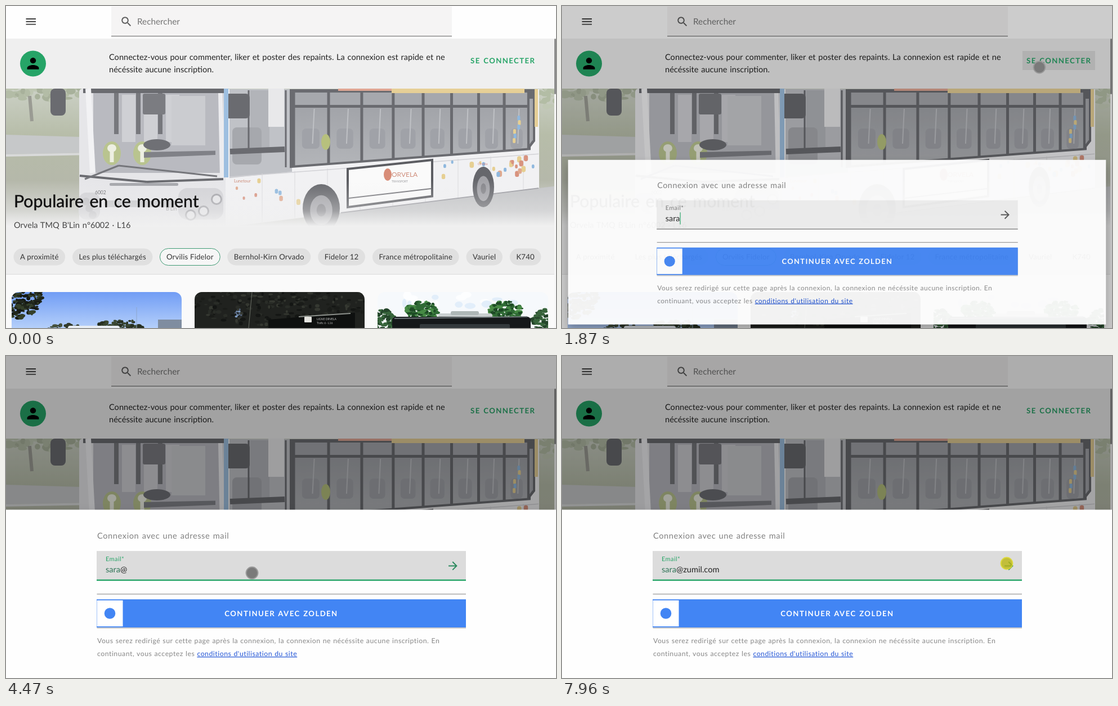
Write an HTML page with a canvas that moves like this. It is 977x573 px and loops after 8 s.

```html
<!DOCTYPE html>
<html lang="fr">
<head>
<meta charset="utf-8">
<title>Connexion</title>
<style>
  html, body { margin: 0; width: 100%; height: 100%; overflow: hidden; background: #fafafa; }
  canvas, svg { position: absolute; left: 0; top: 0; width: 977px; height: 573px; }
  text { font-family: Lato, "Open Sans", sans-serif; font-size: 14.6px; word-spacing: 1px; fill: #222; text-rendering: geometricPrecision; white-space: pre; }
  .cta { font-size: 13.2px; font-weight: 700; letter-spacing: 1.4px; fill: #26a467; }
  .title { font-size: 30.2px; word-spacing: 2.8px; fill: #111; stroke: #111; stroke-width: .45px; }
  .chip { font-size: 13.2px; letter-spacing: .2px; word-spacing: 0; fill: #333; }
  .note { font-size: 12.3px; letter-spacing: .5px; word-spacing: .5px; fill: #888; }
  .note a { fill: #2456d6; text-decoration: underline; }
  #paper { filter: drop-shadow(0 8px 8px rgba(0, 0, 0, .25)); }
</style>
</head>
<body>
<canvas id="scene" width="977" height="573"></canvas>
<svg viewBox="0 0 977 573">
  <path d="M35.5 23H53M35.5 27.8H53M35.5 32.6H53" stroke="#3c3c3c" stroke-width="1.9"/>
  <path transform="translate(202.4 16.4) scale(.96)" fill="#5c5c5c" d="M15.5 14h-.79l-.28-.27C15.41 12.59 16 11.11 16 9.5 16 5.91 13.09 3 9.5 3S3 5.91 3 9.5 5.91 16 9.5 16c1.61 0 3.09-.59 4.23-1.57l.27.28v.79l5 4.99L20.49 19l-4.99-5zm-6 0C7.01 14 5 11.99 5 9.5S7.01 5 9.5 5 14 7.01 14 9.5 11.99 14 9.5 14z"/>
  <text x="233" y="33" style="font-size:15.3px;fill:#757575">Rechercher</text>

  <circle cx="48" cy="102.5" r="23" fill="#26a467"/>
  <path transform="translate(32.4 86.7) scale(1.3)" d="M12 12c2.21 0 4-1.79 4-4s-1.79-4-4-4-4 1.79-4 4 1.79 4 4 4zm0 2c-2.67 0-8 1.34-8 4v2h16v-2c0-2.66-5.33-4-8-4z"/>
  <text x="183" y="96">Connectez-vous pour commenter, liker et poster des repaints. La connexion est rapide et ne</text>
  <text x="183" y="118">nécéssite aucune inscription.</text>
  <rect id="hover" x="818" y="80" width="129" height="34" fill="#000" fill-opacity=".08"/>
  <text class="cta" x="825" y="102">SE CONNECTER</text>

  <text class="title" x="14" y="358">Populaire en ce moment</text>
  <text x="14" y="394.5" style="fill:#444">Orvela TMQ B'Lin n°6002 · L16</text>
  <clipPath id="row"><rect y="430" width="959" height="33"/></clipPath>
  <g id="chips" clip-path="url(#row)"></g>

  <rect id="scrim" width="977" height="573"/>
  <g id="sheet">
    <rect id="paper" y="273.5" width="977" height="299.5" fill="#fefefe"/>
    <text x="162" y="325" style="letter-spacing:.6px;fill:#808080">Connexion avec une adresse mail</text>
    <rect id="field" x="161" y="347" width="656" height="53"/>
    <rect id="rule" x="161" width="656"/>
    <text id="label" x="177" y="365" style="font-size:11px;letter-spacing:.4px">Email*</text>
    <text id="mail" x="177" y="385"><tspan id="stem">sara</tspan><tspan id="tail"></tspan></text>
    <rect id="caret" y="369" width="1.2" height="22" fill="#26a467"/>
    <path id="arrow" transform="translate(782.2 361.7) scale(.98)" d="M12 4l-1.41 1.41L16.17 11H4v2h12.17l-5.58 5.59L12 20l8-8z"/>
    <path d="M161.5 423.6H817" stroke="#999" stroke-width="1.2"/>
    <rect x="161.5" y="435" width="655.5" height="50" fill="#000" fill-opacity=".2"/>
    <rect x="161" y="433" width="656" height="50" fill="#4285f4"/>
    <rect x="161.5" y="434.8" width="46" height="46.4" fill="#fff"/>
    <circle cx="184.5" cy="458" r="9.8" fill="#4285f4"/>
    <text class="cta" x="489" y="463" text-anchor="middle" style="fill:#fff">CONTINUER AVEC ZOLDEN</text>
    <text class="note" x="162" y="511">Vous serez redirigé sur cette page après la connexion, la connexion ne nécéssite aucune inscription. En</text>
    <text class="note" x="162" y="534">continuant, vous acceptez les <a>conditions d'utilisation du site</a></text>
  </g>
  <circle id="pointer" r="10.4" stroke-width="2"/>
</svg>
<script>
const $ = id => document.getElementById(id);
const c = $('scene').getContext('2d');

let seed = 7;
const rnd = () => (seed = seed * 16807 % 2147483647) / 2147483647;

const box = (color, x, y, w, h, r = 0) => {
  c.fillStyle = color; c.beginPath(); c.roundRect(x, y, w, h, r); c.fill();
};
const oval = (color, x, y, rx, ry = rx) => {
  c.fillStyle = color; c.beginPath(); c.ellipse(x, y, rx, ry, 0, 0, 7); c.fill();
};
const line = (color, width, x0, y0, x1, y1) => {
  c.strokeStyle = color; c.lineWidth = width;
  c.beginPath(); c.moveTo(x0, y0); c.lineTo(x1, y1); c.stroke();
};
// Strip from x = a to x = b between two sloping edges
const band = (color, a, b, top, bottom) => {
  c.fillStyle = color; c.beginPath();
  c.moveTo(a, top(a)); c.lineTo(b, top(b)); c.lineTo(b, bottom(b)); c.lineTo(a, bottom(a)); c.fill();
};
const slope = (x0, y0, k = 0) => x => y0 + (x - x0) * k;
const ramp = (y0, y1, ...colors) => {
  const g = c.createLinearGradient(0, y0, 0, y1);
  colors.forEach((color, i) => g.addColorStop(i / (colors.length - 1), color));
  return g;
};
const leaves = (n, x, y, w, h, size, ...colors) => {
  for (let i = 0; i < n; i++) {
    const a = rnd() * 6.283, d = Math.sqrt(rnd());
    oval(colors[i % colors.length], x + Math.cos(a) * d * w, y + Math.sin(a) * d * h, size * (.4 + rnd()), size * (.3 + rnd() * .6));
  }
};
const sign = (str, x, y, size, color) => {
  c.font = `${size}px Lato, sans-serif`; c.fillStyle = color; c.fillText(str, x, y);
};
const clipped = (x, y, w, h, r, paint) => {
  c.save(); c.beginPath(); c.roundRect(x, y, w, h, r); c.clip(); paint(); c.restore();
};

const DARK = '#6a6b70', GLASS = '#a6a8ad', PALE = '#f1f1f3';
const roof = slope(0, 148), belt = slope(508, 288, -.075), foot = slope(395, 393, -.125);

function landscape() {
  box(ramp(147, 393, '#cbd0c5', '#b7bda9', '#b5b8aa', '#c9cac6'), 0, 147, 974, 246);
  leaves(70, 60, 152, 85, 20, 8, '#b3bca6', '#bec6b2', '#a8b19b');
  leaves(30, 960, 160, 20, 40, 7, '#b3bda5', '#c0c8b4');
  line('#9a9b93', 6, 42, 160, 46, 205);
  band('#c6c8c9', 0, 140, slope(0, 229, .03), slope(0, 264, -.02));
  band('#d9dada', 0, 140, slope(0, 264, -.02), slope(0, 268, -.02));
  band('#c3c4c6', 560, 974, foot, slope(0, 393));
}

function front() {
  box('#e6e6e9', 130, 147, 268, 246, 6);
  box('#b9bac0', 155, 147, 231, 150);
  for (let x = 196; x < 300; x += 39) {
    box('#cfd0d4', x + 10, 158, 24, 84);
    line('#77787d', 8, x, 150, x, 228);
  }
  box('#7b7c81', 243, 156, 40, 37, 3);
  box('#cbccd0', 294, 160, 60, 88);
  box(DARK, 137, 147, 250, 8);
  for (const x of [188, 242]) {
    oval('#b9c48f', x, 262, 16, 21);
    line('#edefe2', 7, x, 252, x, 278);
    oval('#edefe2', x, 253, 8, 7);
  }
  oval('#6f7075', 268, 247, 24, 10);
  band('#808187', 245, 372, slope(245, 260, -.02), slope(245, 270, -.04));
  line('#f2f2f4', 10, 146, 147, 154, 297);
  line('#ececef', 8, 381, 155, 384, 305);
  line(DARK, 4, 131, 302, 250, 313);
  line(DARK, 4, 250, 313, 386, 308);
  line('#75767b', 3, 140, 308, 200, 284);
  line('#75767b', 3, 200, 284, 375, 303);
  box('#a4a5aa', 184, 315, 122, 5, 2);
  box('#c6c7ca', 175, 346, 130, 12, 4);
  box('#d2d2d6', 306, 324, 80, 56, 16);
  box('#d2d2d6', 129, 332, 38, 48, 14);
  for (let i = 0; i < 3; i++) {
    oval('#a2a2a7', 328 + i * 23, 372 - i * i * 7, 10);
    oval('#e4e4e7', 328 + i * 23, 372 - i * i * 7, 7);
    oval('#c0c0c4', 142 + i * 6, 348 + i * 12, 7);
  }
  sign('6002', 158, 335, 8.5, '#66666a');
  sign('B\'Lin', 284, 364, 9, '#999');
  box(DARK, 79, 147, 27, 48, 8);
}

function wheel(x, y, rx, ry) {
  oval('#66676c', x, y, rx, ry);
  oval('#a3a3a8', x, y + ry * .08, rx * .6, ry * .62);
  oval('#85858a', x, y + ry * .08, rx * .25, ry * .26);
}

function door() {
  band('#c0c2c7', 397, 508, roof, slope(397, 306, -.1));
  box('#b2b4b9', 434, 150, 34, 104);
  box(GLASS, 402, 216, 52, 66, 8);
  box('#e8e8ea', 466, 147, 28, 68);
  for (const x of [431, 497]) line(DARK, 3, x, 150, x, 254 + (x - 431) * .5);
  line(DARK, 10, 398, 259, 495, 255);
  box(DARK, 389, 156, 44, 44, 7);
  box('#9ebfe0', 387, 147, 8, 158);
}

function windows() {
  band(DARK, 504, 932, roof, belt);
  for (let i = 0, x = 511, w = 62; i < 8; i++, x += w, w *= .95) {
    const a = x + 2.5, b = x + w - 2.5;
    band(GLASS, a, b, slope(0, 154), slope(0, 176));
    band(ramp(180, 285, '#a2a4a9', '#b3b5b9'), a, b, slope(0, 181), x => belt(x) - 4);
    box('#a0a2a8', a + w * .2, 218, w * .5, 36, 7);
    line('#bfc1c5', 2, a + w * .55, 183, a + w * .5, 245);
  }
  band(DARK, 928, 940, roof, slope(928, 256, -1.3));
  band(GLASS, 930, 936, slope(0, 165), slope(930, 246, -1.3));
  box('#dfa593', 590, 147, 98, 4);
  box('#e6cf96', 685, 147, 236, 8);
  band('#e6cf96', 939, 945, roof, slope(0, 215));
  oval('#b7c07d', 568, 242, 8, 14);
}

function side() {
  band(PALE, 390, 947, roof, foot);
  door();
  windows();
  for (let x = 455; x < 940; x += 58) line('#d9d9dc', 1, x, belt(x) + 6, x, foot(x));
  line('#d2d2d6', 1.5, 397, belt(397) + 8, 946, belt(946) + 8);
  line('#9a9aa0', 2, 595, foot(595), 946, foot(946));

  const tints = ['#8fb8de', '#e6cf92', '#e0a98e', '#d8937f'];
  for (let i = 0; i < 34; i++) {
    const x = i < 8 ? 400 + rnd() * 120 : 770 + rnd() * 165, r = 2.5 + rnd() * 3;
    box(tints[i % 4], x, belt(x) + 8 + rnd() * (i < 8 ? 50 : 28), r * 1.5, r * 2.2, r * .7);
  }
  for (let i = 0; i < 6; i++) box(tints[i % 2], 898 + rnd() * 18, 195 + i * 8, 5, 9, 2);

  const top = slope(607, 288, -.107), bottom = slope(607, 360, -.13);
  band('#5c5d62', 605, 759, top, bottom);
  band('#fafafa', 609, 755, x => top(x) + 4, x => bottom(x) - 4);
  line('#77777c', 2, 609, 342, 755, 325);
  oval('#d88d78', 678, 300, 7, 11);
  sign('ORVELA', 685, 304, 12, '#cf8e7c');
  sign('TRANSPORT', 685, 314, 5, '#9a9a9e');
  sign('Lunetour', 405, 314, 7.5, '#cc8b78');
  sign('Orvela', 838, 283, 6, '#c88');

  wheel(560, 360, 33, 43);
  wheel(848, 322, 19, 36);
}

function cards() {
  clipped(10, 509, 302, 80, 13, () => {
    box(ramp(509, 573, '#719df5', '#b4cffa'), 10, 509, 302, 80);
    leaves(320, 18, 518, 46, 38, 4, '#20261c', '#35402a', '#171b15');
    leaves(110, 205, 573, 45, 14, 4, '#273022', '#3a4732');
    leaves(50, 105, 575, 40, 8, 4, '#323b2c', '#46523d');
    box('#7f8da0', 270, 558, 45, 20);
    box('#e8edf3', 110, 569, 92, 8, 5);
    line('#8da6cc', 1, 232, 573, 232, 536);
  });
  clipped(335, 509, 302, 80, 13, () => {
    box('#20221f', 335, 509, 302, 80);
    leaves(300, 486, 525, 165, 45, 4, '#1a1c19', '#292c27', '#353831', '#141614');
    leaves(12, 413, 547, 6, 8, 2, '#7f9cc4', '#53617a');
    line('#6b7067', 1, 437, 509, 431, 573);
    band('#0e100f', 466, 620, slope(466, 558, -.08), slope(0, 573));
    line('#8d918c', 2, 520, 553, 612, 547);
    box('#e4e4df', 530, 553, 13, 10, 1);
    sign('LIGNE ORVELA', 552, 559, 5, '#ccc');
    sign('Trafic 6 · L16', 552, 566, 5, '#bbb');
  });
  clipped(660, 509, 303, 80, 13, () => {
    box('#f6f9fc', 660, 509, 303, 80);
    leaves(16, 800, 522, 130, 12, 9, '#e2eefa', '#fdfeff');
    for (const x of [738, 888]) leaves(150, x, 543, 28, 18, 4, '#2f6a35', '#478a45', '#1d4a25');
    for (const x of [668, 958]) leaves(90, x, 560, 24, 20, 4, '#24452a', '#37643b');
    box('#c9cfd0', 768, 547, 96, 8, 4);
    box('#aeb7b7', 790, 543, 50, 7, 3);
    box('#15181a', 686, 553, 246, 40, 6);
    line('#6d7578', 2, 690, 556, 926, 553);
    box('#33393c', 735, 566, 160, 9, 2);
  });
}

function paintPage() {
  box('#fafafa', 0, 0, 977, 573);
  box('#fefefe', 0, 0, 977, 58);
  box('#f5f4f4', 187, 1, 605, 53);
  box('#777', 187, 53, 605, 1.3);
  box('#efefef', 0, 58, 974, 419);
  clipped(0, 147, 974, 246, 0, () => {
    landscape(); front(); side();
    box(ramp(310, 392, '#f0f0f000', '#f0f0f030', '#f0f0f068', '#f0f0f0'), 0, 310, 974, 83);
  });
  box('#dcdcdc', 0, 477, 974, 1);
  cards();
  box('#f7f7f7', 974, 58, 3, 515);
  box('#8c8c8c', 974, 58, 3, 99, 1.5);
}

// Chips flow from their own text widths
function layChips() {
  const names = ['A proximité', 'Les plus téléchargés', 'Orvilis Fidelor', 'Bernhol-Kirn Orvado',
    'Fidelor 12', 'France métropolitaine', 'Vauriel', 'K740', 'Navette'];
  const add = (tag, attrs) => {
    const el = document.createElementNS('http://www.w3.org/2000/svg', tag);
    for (const k in attrs) el.setAttribute(k, attrs[k]);
    return $('chips').appendChild(el);
  };
  let x = 13;
  names.forEach((name, i) => {
    const picked = i === 2;
    const pill = add('rect', {
      x: x + .5, y: 431.5, height: 30, rx: 15,
      fill: picked ? '#f6f6f6' : '#e0e0e0', stroke: picked ? '#3f9a74' : 'none'
    });
    const label = add('text', { class: 'chip', x: x + 12, y: 451 });
    label.textContent = name;
    const w = label.getComputedTextLength() + 24;
    pill.setAttribute('width', w - 1);
    x += w + 12;
  });
}

const LOOP = 8000, OPEN = 1800, FOCUS = 2470, BLINK = 530;
const bursts = [
  { at: 3940, gap: 0, text: '@' },
  { at: 5010, gap: 97.5, text: 'zumil' },
  { at: 6010, gap: 0, text: '.' },
  { at: 6210, gap: 65, text: 'com' }
];
const keys = bursts.flatMap(b => [...b.text].map((char, i) => ({ char, at: b.at + i * b.gap })));
const moves = [
  { from: 650, to: 780, n: 3, x: 847.5, y: 205, lift: 0 },
  { from: 1040, to: 1340, n: 5, x: 848, y: 109, lift: 0 },
  { from: 2010, to: 2540, n: 9, x: 437, y: 386, lift: 0 },
  { from: 6890, to: 7680, n: 13, x: 790, y: 369, lift: 30 }
];

const clamp = v => Math.min(1, Math.max(0, v));
const smooth = u => u * u * (3 - 2 * u);
const steps = (t, a, b, n) => clamp((Math.floor((t - a) / (b - a) * (n - 1) + 1e-6) + 1) / n);
const set = (id, attrs) => { for (const k in attrs) $(id).setAttribute(k, attrs[k]); };

function movePointer(t) {
  let x = 883, y = 473;
  for (const m of moves) {
    const u = smooth(steps(t, m.from, m.to, m.n));
    x += (m.x - x) * u;
    y += (m.y - y) * u - m.lift * Math.sin(Math.PI * u);
  }
  const pressed = t >= OPEN && t < 2010 || t >= 2540 && t < 6890;
  set('pointer', {
    cx: x, cy: y, opacity: t < 650 ? 0 : 1,
    fill: pressed ? '#7a7a7a' : 'rgba(188,182,18,.8)',
    stroke: pressed ? '#999' : 'rgba(222,217,50,.85)'
  });
}

function openSheet(t) {
  const shown = t >= OPEN;
  const k = clamp(Math.floor((t - OPEN) / 70) / 2);
  const out = 1 - (1 - k) ** 2;
  const s = .912 + .088 * out;
  set('scrim', { opacity: shown ? .07 + .25 * k : 0 });
  set('sheet', {
    opacity: shown ? Math.min(1, .55 + .8 * k) : 0,
    transform: `translate(488.5 ${411 + 12 * out}) scale(${s}) translate(-488.5 -423)`
  });
  set('hover', { opacity: shown && t < 2075 ? 1 : 0 });
}

function fillField(t) {
  const on = t >= FOCUS, ready = t >= OPEN + 70, green = '#26a467';
  set('field', { fill: on ? '#dcdcdc' : '#eee', opacity: ready ? 1 : .2 });
  set('rule', { y: on ? 397.7 : 398.8, height: on ? 2.4 : 1.3, fill: on ? green : '#777' });
  set('arrow', { fill: on ? '#2b8a5e' : '#555' });
  $('label').style.fill = on ? green : '#777';
  $('label').style.opacity = ready ? 1 : 0;
  $('stem').style.fill = on ? '#2f7457' : '#222';

  const typed = keys.filter(k => k.at <= t);
  $('tail').textContent = typed.map(k => k.char).join('');
  const last = typed.length ? typed[typed.length - 1].at : 3080;
  const lit = t < 2540 ? ready : t >= 3080 && Math.floor((t - last) / BLINK) % 2 === 0;
  set('caret', { x: 177.2 + $('mail').getComputedTextLength(), opacity: lit ? 1 : 0 });
}

paintPage();
layChips();
const start = performance.now();
function frame() {
  const t = (performance.now() - start) % LOOP;
  openSheet(t);
  fillField(t);
  movePointer(t);
  requestAnimationFrame(frame);
}
frame();
</script>
</body>
</html>
```
